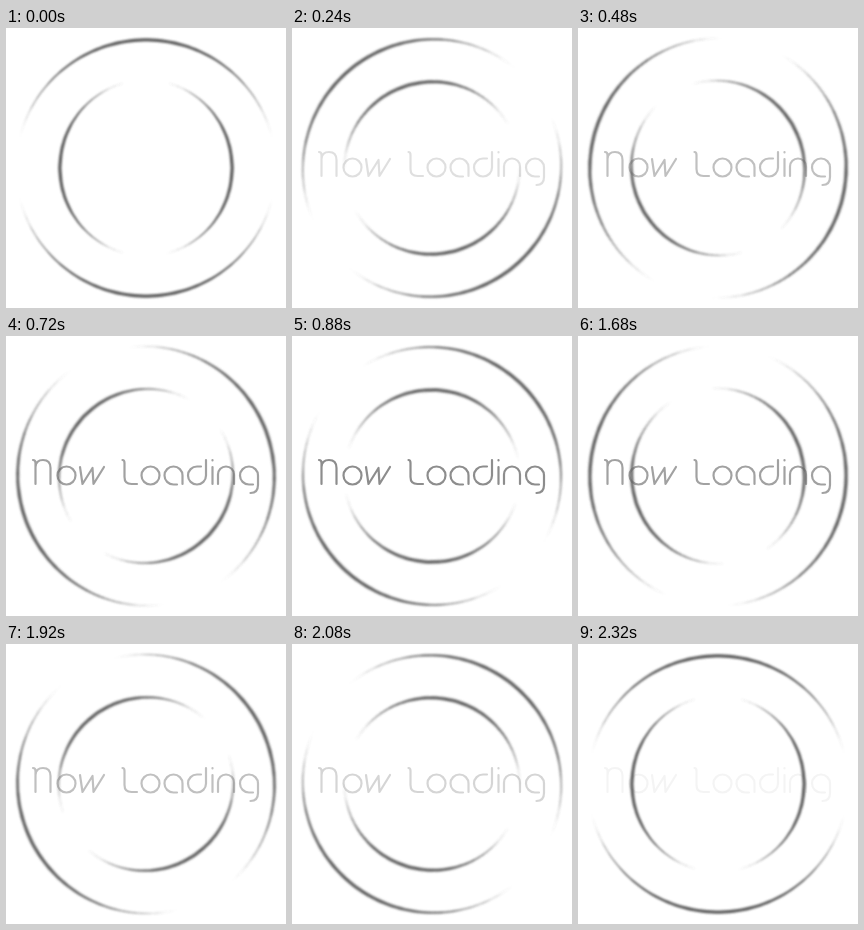
Animation, 280 px wide and 280 px high, one loop 2400 ms. Source, as an HTML page:

```html
<!DOCTYPE html>
<html lang="en">
<head>
<meta charset="utf-8">
<title>Now Loading</title>
<style>
  html, body { margin: 0; width: 100%; height: 100%; overflow: hidden; background: #fff; }
  svg { display: block; width: 100vw; height: 100vh; }

  .ring { fill: #5c5c5c; transform-origin: 140px 140px; animation: 2.4s steps(30, jump-none) infinite; }
  .outer { animation-name: turn-left; }
  .inner { animation-name: turn-right; }
  @keyframes turn-left { to { transform: rotate(-360deg); } }
  @keyframes turn-right { from { transform: rotate(90deg); } to { transform: rotate(810deg); } }

  .label { animation: pulse 2.4s steps(15) infinite; }
  .label path { fill: none; stroke: #646464; stroke-width: 2.2; stroke-linecap: round; stroke-linejoin: round; }
  .label text { font: 33px Lato, sans-serif; fill: transparent; }
  @keyframes pulse {
    0%, 100% { opacity: 0; }
    50% { opacity: 1; }
  }
</style>
</head>
<body>
<svg viewBox="0 0 280 280">
  <defs>
    <filter id="soft" filterUnits="userSpaceOnUse" x="0" y="0" width="280" height="280">
      <feGaussianBlur stdDeviation="0.85"/>
    </filter>
  </defs>
  <g filter="url(#soft)">
    <path class="ring outer" data-radius="129.7"/>
    <path class="ring inner" data-radius="87.7"/>
  </g>
  <g class="label">
    <text x="25" y="148">Now Loading</text>
    <!-- N o w -->
    <path d="M27 124Q29.500 124 29.500 127V148M29.500 131Q30 124 37 124Q44.500 124 44.500 132V148"/>
    <path d="M51.500 139.500a9 9 0 1 1 18 0a9 9 0 1 1 -18 0"/>
    <path d="M74 131L76.500 148L86.500 132L87.500 148L98 131"/>
    <!-- L o a -->
    <path d="M116.500 124Q118.500 124 118.500 127V141Q118.500 148 125.500 148H131"/>
    <path d="M135.500 139.500a9 9 0 1 1 18 0a9 9 0 1 1 -18 0"/>
    <path d="M176.500 148V139.500a9 9 0 1 0 -9 9H171"/>
    <!-- d i n g -->
    <path d="M200 124V139.500a9 9 0 1 1 -9 -9H195"/>
    <path d="M206.500 131V148M206.500 124V124.500"/>
    <path d="M212 148V138.500a8 8 0 0 1 16 0V148"/>
    <path d="M247 148.500H243a9 9 0 1 1 9 -9V149Q252 157 244.500 157"/>
  </g>
</svg>
<script>
  const CENTER = 140, THICKNESS = 3.3, SPAN = 77;

  const point = (radius, deg) => {
    const a = deg * Math.PI / 180;
    return (CENTER + radius * Math.sin(a)).toFixed(2) + ' ' +
           (CENTER - radius * Math.cos(a)).toFixed(2);
  };

  // An arc that thins out from its middle towards both tips.
  function crescent(radius, middle) {
    const rim = [], hollow = [];
    for (let d = -SPAN; d <= SPAN; d += 2) {
      const depth = THICKNESS * Math.cos(d / SPAN * Math.PI / 2) ** 1.6;
      rim.push(point(radius, middle + d));
      hollow.unshift(point(radius - depth, middle + d));
    }
    return 'M' + rim.concat(hollow).join('L') + 'Z';
  }

  for (const ring of document.querySelectorAll('.ring')) {
    const radius = +ring.dataset.radius;
    ring.setAttribute('d', crescent(radius, 0) + crescent(radius, 180));
  }
</script>
</body>
</html>
```
